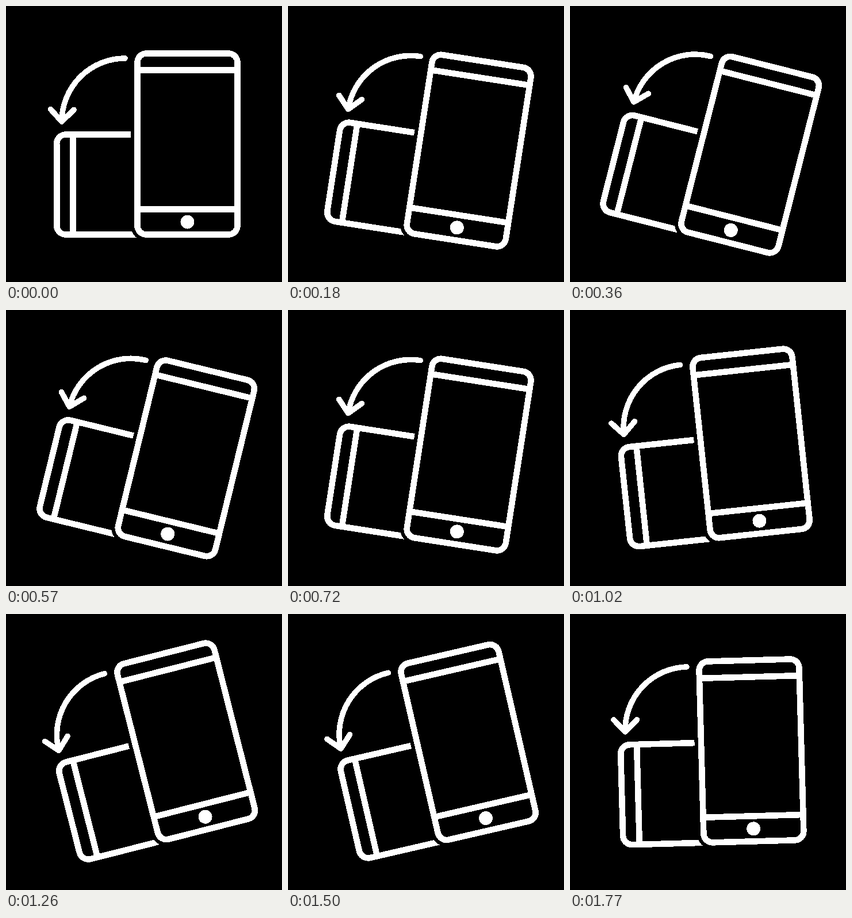
An HTML page that plays this animation: 480x480 px, repeating every 1.8 s.

```html
<!DOCTYPE html>
<html lang="en">
<head>
<meta charset="utf-8">
<title>Rotate device</title>
<style>
  html, body { margin: 0; height: 100%; overflow: hidden; background: #000; }
  svg { display: block; width: 100vw; height: 100vh; }
</style>
</head>
<body>
<svg viewBox="0 0 480 480" shape-rendering="crispEdges">
  <g id="icon" fill="none" stroke="#fff" stroke-width="10.600">
    <!-- phone lying behind -->
    <path d="M240 223.500H104.200a16 16 0 0 0-16 16V381.500a16 16 0 0 0 16 16H240M116.500 223.500V397.500"/>
    <!-- upright phone, with a dark gap around it -->
    <rect x="228.500" y="82.500" width="174" height="315" rx="15.500" fill="#000" stroke="#000" stroke-width="23"/>
    <rect x="228.500" y="82.500" width="174" height="315" rx="15.500"/>
    <path d="M228.500 111.500H402.500M228.500 353.500H402.500"/>
    <circle cx="315.500" cy="375.500" r="12" fill="#fff" stroke="none"/>
    <!-- arrow -->
    <path d="M207 91A110 110 0 0 0 97 201M77.500 179.500L97 201L118 180.500" stroke-width="9.600" stroke-linecap="round" stroke-linejoin="round"/>
  </g>
</svg>
<script>
  const LOOP = 1800, STEP = 30, SWING = 15;
  const icon = document.getElementById('icon');

  function draw() {
    const t = Math.floor(performance.now() % LOOP / STEP) * STEP;
    const angle = SWING * Math.sin(2 * Math.PI * t / LOOP);
    icon.setAttribute('transform', `rotate(${angle} 240 240)`);
    requestAnimationFrame(draw);
  }
  draw();
</script>
</body>
</html>
```
